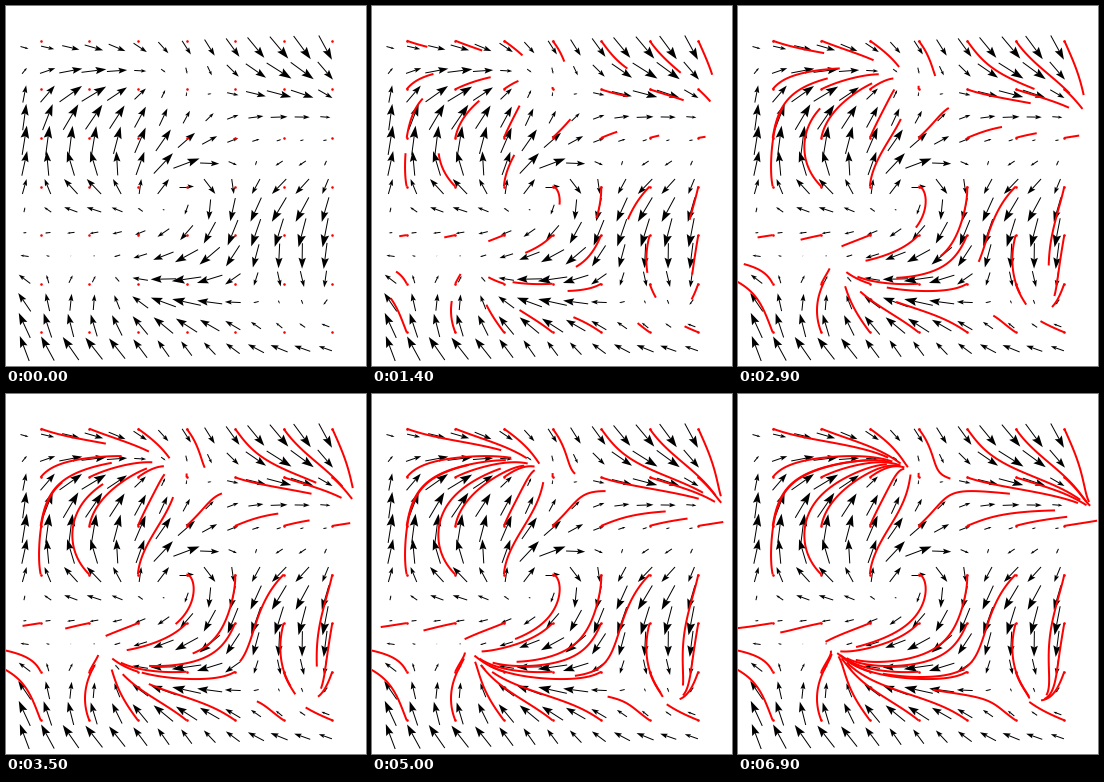
A matplotlib script for the animation above (7000 ms loop, 360 by 360 pixels).

```python
import numpy as np
import matplotlib.pyplot as plt
from matplotlib.animation import FuncAnimation
from matplotlib.collections import LineCollection, PolyCollection

SIZE = 360
DPI = 100
CENTER = 180.5
UNIT = 48.6           # pixels per unit of the plane
GRID_STEP = 10 / 21   # spacing of the arrows
ARROW_SCALE = 15      # arrow pixels per unit of speed
FRAMES = 70
INTERVAL = 100
DT = 0.0345           # flow time per frame
SUBSTEPS = 10


def points(px):
    return px * 72 / DPI


def field(p):
    """Clockwise unit swirl plus a wavy part; softened at the origin."""
    x, y = p[..., 0], p[..., 1]
    r = np.sqrt(x**2 + y**2 + 0.005)
    u = y / r + np.cos(1.5 * x) * np.cos(1.5 * y)
    v = -x / r + np.sin(1.5 * y)
    return np.stack([u, v], axis=-1)


def to_stage(p):
    return CENTER + UNIT * p * np.array([1, -1])


def lattice(values):
    x, y = np.meshgrid(values, values)
    return np.column_stack([x.ravel(), y.ravel()])


def rk4(p, h):
    k1 = field(p)
    k2 = field(p + h / 2 * k1)
    k3 = field(p + h / 2 * k2)
    k4 = field(p + h * k3)
    return p + h / 6 * (k1 + 2 * k2 + 2 * k3 + k4)


def flow(start):
    """Positions of all particles at every substep, in stage pixels."""
    path = [start]
    for _ in range((FRAMES - 1) * SUBSTEPS):
        path.append(rk4(path[-1], DT / SUBSTEPS))
    return to_stage(np.array(path))


def arrows(grid):
    """Shafts and notched heads of arrows centred on the grid points."""
    mid = to_stage(grid)
    vec = ARROW_SCALE * field(grid) * np.array([1, -1])
    side = np.column_stack([-vec[:, 1], vec[:, 0]])
    tail, tip = mid - vec / 2, mid + vec / 2
    notch = tip - 0.36 * vec
    back = tip - 0.43 * vec
    shafts = np.stack([tail, notch], axis=1)
    heads = np.stack([tip, back + 0.145 * side, notch, back - 0.145 * side], axis=1)
    return shafts, heads


fig = plt.figure(figsize=(SIZE / DPI, SIZE / DPI), dpi=DPI, facecolor="white")
ax = fig.add_axes([0, 0, 1, 1])
ax.set_xlim(0, SIZE)
ax.set_ylim(SIZE, 0)
ax.axis("off")

shafts, heads = arrows(lattice(GRID_STEP * np.arange(-7, 7)))
ax.add_collection(LineCollection(shafts, colors="black", linewidths=points(1), zorder=1))
ax.add_collection(PolyCollection(heads, facecolors="black", edgecolors="none", zorder=2))

paths = flow(lattice(np.arange(-3, 4).astype(float)))
ax.scatter(*paths[0].T, s=points(2.6) ** 2, color="red", linewidths=0, zorder=3)
trails = LineCollection([], colors="red", linewidths=points(2), zorder=4)
ax.add_collection(trails)


def update(frame):
    if frame == 0:
        trails.set_segments([])
    else:
        trails.set_segments(paths[:frame * SUBSTEPS + 1].swapaxes(0, 1))
    return [trails]


anim = FuncAnimation(fig, update, frames=FRAMES, interval=INTERVAL, repeat=True,
                     repeat_delay=0, blit=False)
plt.show()
```
